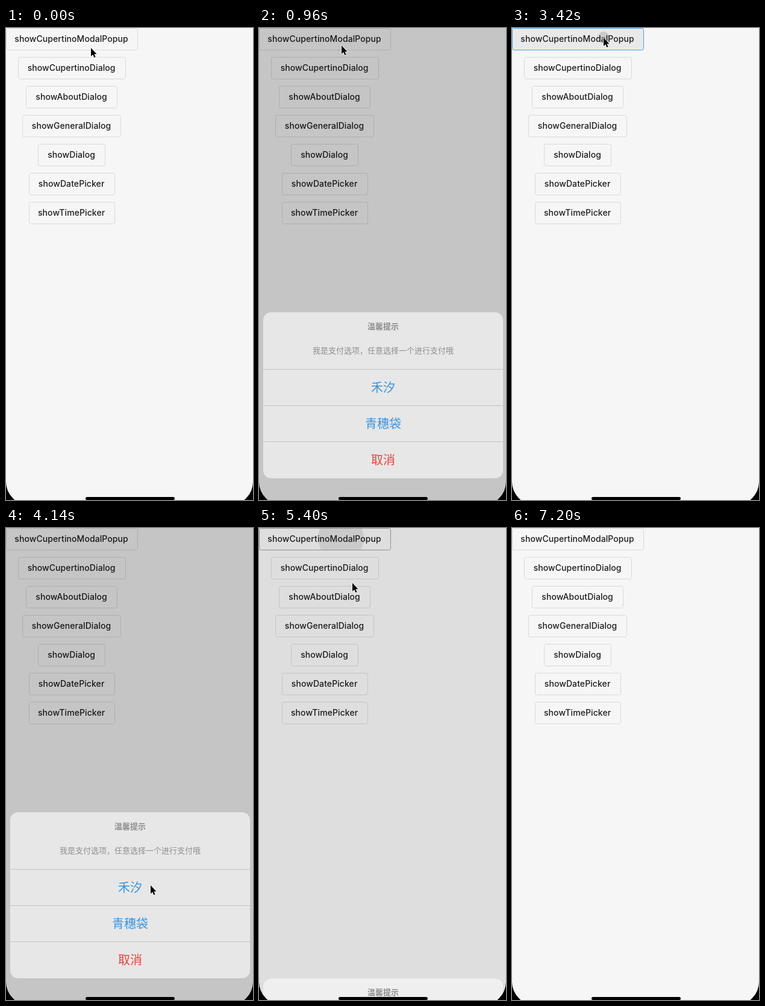
Recreate the animation shown at these times as an HTML page with a canvas. Size 410 by 782 pixels, loop 7.26 s.

```html
<!DOCTYPE html>
<html lang="zh">
<head>
<meta charset="utf-8">
<style>
html, body { margin: 0; width: 410px; height: 782px; overflow: hidden; background: #000; }
canvas { display: block; }
</style>
</head>
<body>
<canvas id="stage" width="410" height="782"></canvas>
<script>
const W = 410, H = 782, LOOP = 7260, STEP = 60, SLIDE = 300;
const SHEET_TOP = 471, SHEET_BOTTOM = 746;
const ctx = document.getElementById('stage').getContext('2d');

const LATIN = 'Inter, "Liberation Sans", sans-serif';
const CJK = '"Noto Sans CJK SC", "Noto Sans CJK", sans-serif';

// Name, left edge, width
const buttons = [
  ['showCupertinoModalPopup', 0, 218],
  ['showCupertinoDialog', 20, 178],
  ['showAboutDialog', 33, 151],
  ['showGeneralDialog', 27, 163],
  ['showDialog', 53, 111],
  ['showDatePicker', 38, 142],
  ['showTimePicker', 38, 142]
];

const popups = [
  { press: 230, open: 300, close: 1620, x: 141, y: 31 },
  { press: 3390, open: 3450, close: 4400, x: 152, y: 16 },
  { press: 5310, open: 5322, close: 6535, x: 152, y: 16 }
];

// Pointer keys: time, x, y
const route = [
  [0, 141, 33], [300, 141, 31], [960, 137, 29], [1500, 250, 755],
  [2400, 250, 755], [3120, 155, 25], [3420, 152, 16], [3560, 152, 16],
  [4140, 240, 592], [4380, 396, 752], [4700, 396, 752], [5160, 150, 15],
  [5320, 150, 15], [5400, 155, 91], [5820, 238, 560], [6480, 268, 734],
  [6540, 269, 753], [6840, 269, 753], [7080, 262, 800], [LOOP, 262, 800]
];

const clamp = v => Math.min(1, Math.max(0, v));
const mix = (a, b, p) => a + (b - a) * p;
const smooth = p => p * p * (3 - 2 * p);
const slideCurve = p => p * p * p * (p * (6 * p - 15) + 10);
const dimCurve = p => 1 - Math.pow(1 - p, 2.3);

function box(x, y, w, h, r) {
  ctx.beginPath();
  ctx.roundRect(x, y, w, h, r);
}

function label(text, x, y, font, color, spacing = 0) {
  ctx.font = font;
  ctx.letterSpacing = spacing + 'px';
  ctx.fillStyle = color;
  ctx.textAlign = 'center';
  ctx.textBaseline = 'alphabetic';
  ctx.fillText(text, x, y);
}

function drawInk(popup, t) {
  const age = t - popup.open;
  const r = 10 + Math.max(0, age) * 28 / 78;
  const drift = clamp((r - 10) / 75);
  ctx.save();
  ctx.clip();
  if (age < 20) {
    ctx.fillStyle = 'rgba(0,0,0,.055)';
    ctx.fillRect(0, 0, 220, 37);
  }
  ctx.fillStyle = `rgba(0,0,0,${0.13 * (1 - clamp(age / 260))})`;
  ctx.beginPath();
  ctx.arc(mix(popup.x, 109, drift), mix(popup.y, 18, drift), r, 0, 7);
  ctx.fill();
  ctx.restore();
}

function drawButtons(t) {
  const active = popups.find(p => t >= p.press && t < p.open + 260);
  buttons.forEach(([name, left, w], i) => {
    const x = left + 0.5, y = i * 48 + 0.5;
    const pressed = i === 0 && active;
    box(x, y, w, 36, 3);
    if (pressed) drawInk(active, t);
    box(x, y, w, 36, 3);
    ctx.lineWidth = 1;
    ctx.strokeStyle = !pressed ? '#d9d9d9' : t < active.open + 20 ? '#4ca3e6' : '#a0a0a0';
    ctx.stroke();
    label(name, 108.6, y + 22.5, '500 14px ' + LATIN, '#1e1e1e', 0.08);
  });
}

function drawSheet(shown) {
  ctx.save();
  ctx.translate(0, (1 - shown) * (H - SHEET_TOP));
  box(7, SHEET_TOP, 398, SHEET_BOTTOM - SHEET_TOP, 13);
  ctx.fillStyle = 'rgba(247,247,247,.7)';
  ctx.fill();
  ctx.fillStyle = '#c2c2c2';
  for (const y of [565, 625, 685]) ctx.fillRect(7, y, 398, 1);
  label('温馨提示', 206, 499, 'bold 13px ' + CJK, '#8c8c8c');
  label('我是支付选项，任意选择一个进行支付哦', 206, 539, '13px ' + CJK, '#8f8f8f');
  label('禾汐', 206, 603, '20px ' + CJK, '#3695e3');
  label('青穗袋', 206, 663, '20px ' + CJK, '#3695e3');
  label('取消', 206, 723, '20px ' + CJK, '#e9443b');
  ctx.restore();
}

function drawBezel() {
  ctx.fillStyle = '#000';
  for (const side of [1, -1]) {
    ctx.save();
    if (side < 0) {
      ctx.translate(W, 0);
      ctx.scale(-1, 1);
    }
    ctx.beginPath();
    ctx.moveTo(0, 752);
    ctx.arc(38, 752, 38, Math.PI, Math.PI / 2, true);
    ctx.lineTo(0, 790);
    ctx.fill();
    ctx.restore();
  }
  box(132, 777, 148, 5, 2.5);
  ctx.fill();
}

function drawPointer(t) {
  const i = route.findIndex(k => k[0] > t);
  const [t0, x0, y0] = route[i - 1], [t1, x1, y1] = route[i];
  const p = smooth((t - t0) / (t1 - t0));
  ctx.save();
  ctx.translate(mix(x0, x1, p), mix(y0, y1, p));
  const arrow = new Path2D('M0 0V14L3.2 11L5.4 16L7.6 15L5.4 10.2H9.6Z');
  ctx.lineJoin = 'round';
  ctx.lineWidth = 1.5;
  ctx.strokeStyle = '#fff';
  ctx.stroke(arrow);
  ctx.fillStyle = '#000';
  ctx.fill(arrow);
  ctx.restore();
}

function draw(t) {
  ctx.fillStyle = '#f6f6f6';
  ctx.fillRect(0, 0, W, H);
  drawButtons(t);
  const popup = popups.find(p => t > p.open && t < p.close + SLIDE);
  if (popup) {
    const p = Math.min(clamp((t - popup.open) / SLIDE), 1 - clamp((t - popup.close) / SLIDE));
    ctx.fillStyle = `rgba(0,0,0,${0.2 * dimCurve(p)})`;
    ctx.fillRect(0, 0, W, H);
    drawSheet(slideCurve(p));
  }
  drawBezel();
  drawPointer(t);
}

const start = performance.now();
function tick() {
  const t = (performance.now() - start) % LOOP;
  draw(Math.floor(t / STEP) * STEP);
  requestAnimationFrame(tick);
}
tick();
</script>
</body>
</html>
```
